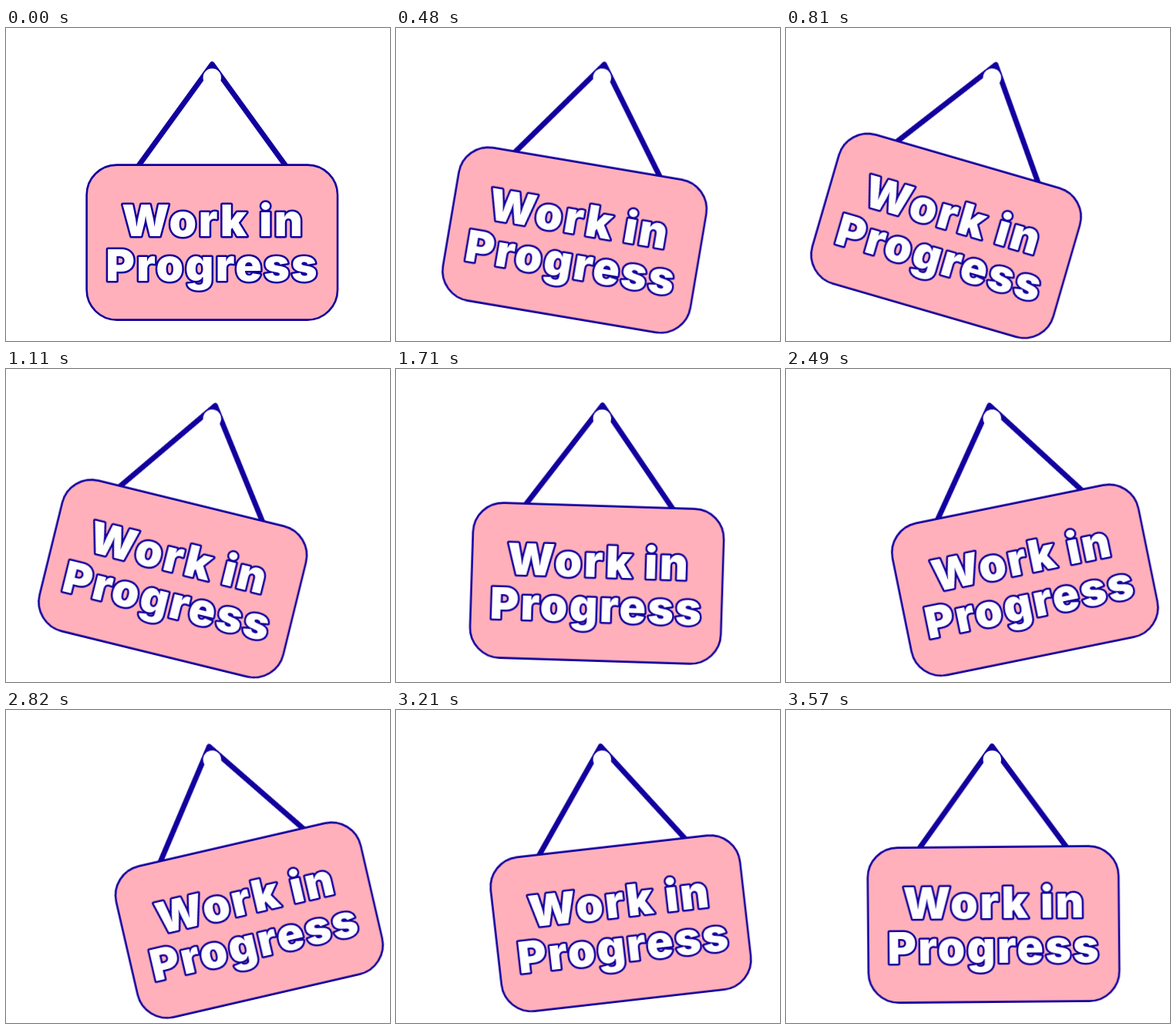
An HTML page that plays this animation: 498x406 px, repeating every 3600 ms.

```html
<!DOCTYPE html>
<html lang="en">
<head>
<meta charset="utf-8">
<title>Work in Progress</title>
<style>
  html, body { margin: 0; width: 100%; height: 100%; overflow: hidden; background: #fff; }
  svg { display: block; width: 498px; height: 406px; }

  .sign {
    transform-origin: 267.3px 64.2px;
    animation: swing 3600ms steps(30, end) infinite;
  }
  .rope { fill: none; stroke: #12009e; stroke-width: 7; stroke-linejoin: round; }
  .board { fill: #ffb0ba; stroke: #12009e; stroke-width: 2.6; }
  .label {
    font: 900 57px Inter, Roboto, sans-serif;
    font-optical-sizing: none;
    font-variation-settings: "opsz" 14;
    letter-spacing: 2.4px;
    text-anchor: middle;
    fill: #fff;
    stroke: #12009e;
    stroke-width: 5;
    stroke-linejoin: round;
    paint-order: stroke;
  }

  /* Each quarter runs at constant speed; the right side swings less. */
  @keyframes swing {
    0%, 50%, 100% { transform: rotate(0deg); }
    25% { transform: rotate(18deg); }
    75% { transform: rotate(-15deg); }
  }
</style>
</head>
<body>
<svg viewBox="0 0 498 406">
  <g class="sign">
    <path class="rope" d="M168 184 L267.3 47 L366.6 184"/>
    <circle cx="267.3" cy="64.2" r="11.7" fill="#fff"/>
    <rect class="board" x="104.6" y="177.6" width="325.4" height="201" rx="39"/>
    <text class="label" x="268.7" y="269.5">Work in</text>
    <text class="label" x="267.7" y="327.5">Progress</text>
  </g>
</svg>
</body>
</html>
```
